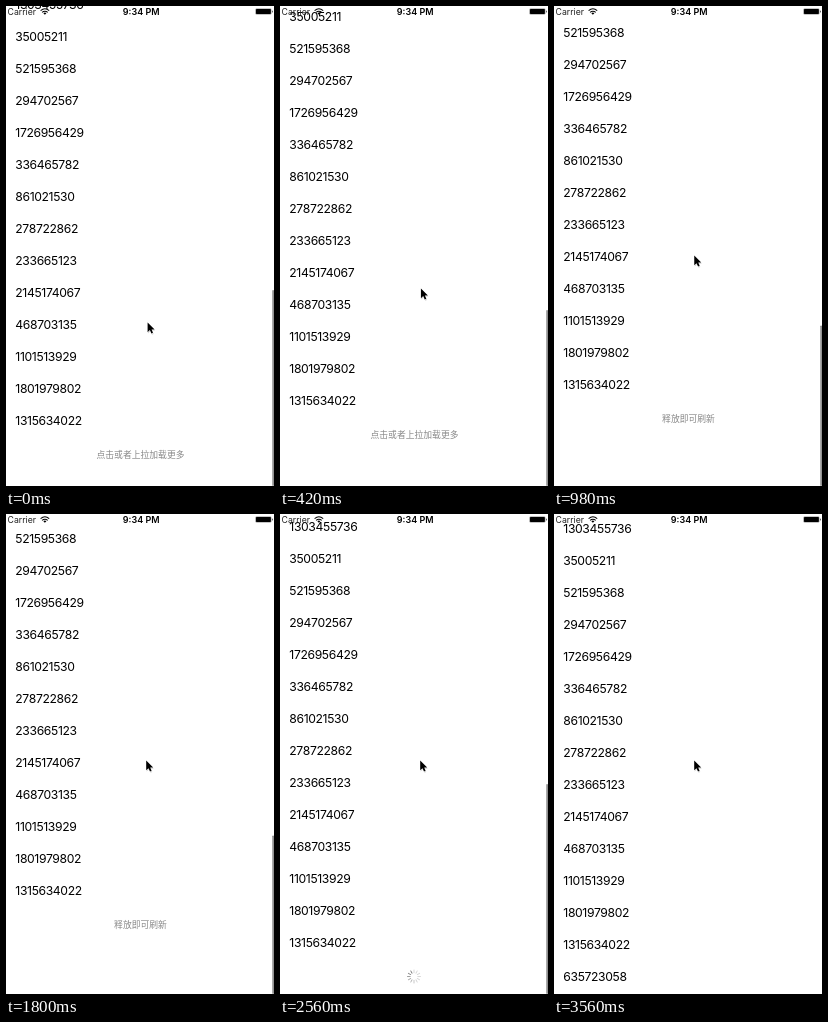
An HTML page for the animation above (3880 ms loop, 268 by 480 pixels).

```html
<!DOCTYPE html>
<html lang="zh-CN">
<head>
<meta charset="utf-8">
<title>Pull to load more</title>
<style>
  html, body { margin: 0; width: 100%; height: 100%; overflow: hidden; background: #fff; }
  svg { display: block; width: 100vw; height: 100vh; }
  text { font-family: Inter, Roboto, sans-serif; fill: #000; }
  .row { font-size: 12.2px; letter-spacing: -.37px; }
  .hint { font: 8.8px "Noto Sans CJK SC", "Noto Sans CJK", sans-serif; fill: #888; text-anchor: middle; }
  .carrier { font-size: 8.7px; fill: #222; }
  .clock { font-size: 9px; font-weight: 600; text-anchor: middle; }
  .spoke { stroke: #666; stroke-width: .9; stroke-linecap: round; }
</style>
</head>
<body>
<svg viewBox="0 0 268 480">
  <g id="list">
    <g id="rows"></g>
    <text id="hint" class="hint" x="134.5" y="37.9"></text>
    <g id="spinner" transform="translate(134 34.5)"></g>
  </g>
  <rect id="bar" x="266.3" width="1.6" rx=".8" fill="#868686"/>

  <text class="carrier" x="1.6" y="8.8">Carrier</text>
  <g fill="none" stroke="#000" stroke-width="1.1">
    <path d="M34.6 4.6Q38.9 1 43.2 4.6M36.1 6.4Q38.9 4 41.7 6.4"/>
    <path d="M37.4 7.2Q38.9 6 40.4 7.2L38.9 8.8Z" fill="#000" stroke="none"/>
  </g>
  <text class="clock" x="135.2" y="8.9">9:34 PM</text>
  <rect x="249.4" y="2.4" width="16" height="6.2" rx="1.3" opacity=".45"/>
  <rect x="250" y="3" width="14.8" height="5" rx=".8"/>
  <rect x="266" y="4.4" width="1" height="2.2" rx=".5" opacity=".6"/>

  <g id="cursor">
    <path d="M.4 1V11L2.8 8.9L4.4 12.3L6.1 11.5L4.6 8.2H7.6Z" fill="#000" opacity=".18"/>
    <path d="M0 0V9.8L2.3 7.7L3.8 11L5.4 10.3L4 7.1H7Z" stroke="#fff" stroke-width=".9" paint-order="stroke"/>
  </g>
</svg>
<script>
const LOOP = 3880, RELEASE = 2240, LOADED = 3560;
const START_Y = 414, PULLED_Y = 376.5, REST_Y = 430;
const ROW = 32, SPOKES = 12, TICK = 1000 / 12;
const numbers = [1303455736, 35005211, 521595368, 294702567, 1726956429, 336465782, 861021530,
  278722862, 233665123, 2145174067, 468703135, 1101513929, 1801979802, 1315634022, 635723058];

// time, list travel, pointer travel
const drag = [
  [0, 0, 0], [420, 20, 34], [540, 27, 47], [640, 30.2, 54],
  [800, 33.4, 61.5], [980, 35.5, 67], [1080, 37, 69], [1220, 37.5, 70]
];

const $ = id => document.getElementById(id);
const list = $('list'), hint = $('hint'), spinner = $('spinner'), bar = $('bar'), cursor = $('cursor');

function add(parent, tag, attrs, text = '') {
  const el = document.createElementNS('http://www.w3.org/2000/svg', tag);
  for (const key in attrs) el.setAttribute(key, attrs[key]);
  el.textContent = text;
  return parent.appendChild(el);
}

// The row before the newest one sits at the list origin.
const rows = numbers.map((n, i) =>
  add($('rows'), 'text', { class: 'row', x: 9.3, y: (i - numbers.length + 2) * ROW + 4.8 }, n));
const newRow = rows[rows.length - 1];

const spokes = Array.from({ length: SPOKES }, (_, i) =>
  add(spinner, 'line', { class: 'spoke', y1: -3.8, y2: -6.5, transform: `rotate(${i * 30})` }));

function dragAt(t, col) {
  const i = drag.findIndex(p => p[0] > t);
  if (i < 0) return drag[drag.length - 1][col];
  const a = drag[i - 1], b = drag[i];
  return a[col] + (b[col] - a[col]) * (t - a[0]) / (b[0] - a[0]);
}

function listY(t) {
  if (t < RELEASE) return START_Y - dragAt(t, 1);
  const x = (t - RELEASE + 15) * .0152;
  return REST_Y - (REST_Y - PULLED_Y) * (1 + x) * Math.exp(-x);
}

const show = (el, on) => { el.style.visibility = on ? 'visible' : 'hidden'; };

function draw(t) {
  const y = listY(t), pull = dragAt(t, 2);
  list.setAttribute('transform', `translate(0 ${y.toFixed(2)})`);

  hint.textContent = t < 500 ? '点击或者上拉加载更多' : '释放即可刷新';
  show(hint, t < RELEASE);
  show(spinner, t >= RELEASE && t < LOADED);
  show(newRow, t >= LOADED);

  const head = Math.floor((t - 2856) / TICK) + 3;
  spokes.forEach((s, i) => {
    const age = ((head - i) % SPOKES + SPOKES) % SPOKES;
    s.style.opacity = Math.max(.28, .9 - age * .1);
  });

  const top = START_Y - y + 284;
  bar.setAttribute('y', top);
  bar.setAttribute('height', 480 - top);
  bar.style.opacity = Math.min(1, Math.max(0, (3100 - t) / 160));

  cursor.setAttribute('transform', `translate(${141.6 - pull * .02} ${316.5 - pull})`);
}

const begin = performance.now();
function tick() {
  draw((performance.now() - begin) % LOOP);
  requestAnimationFrame(tick);
}
draw(0);
requestAnimationFrame(tick);
</script>
</body>
</html>
```
